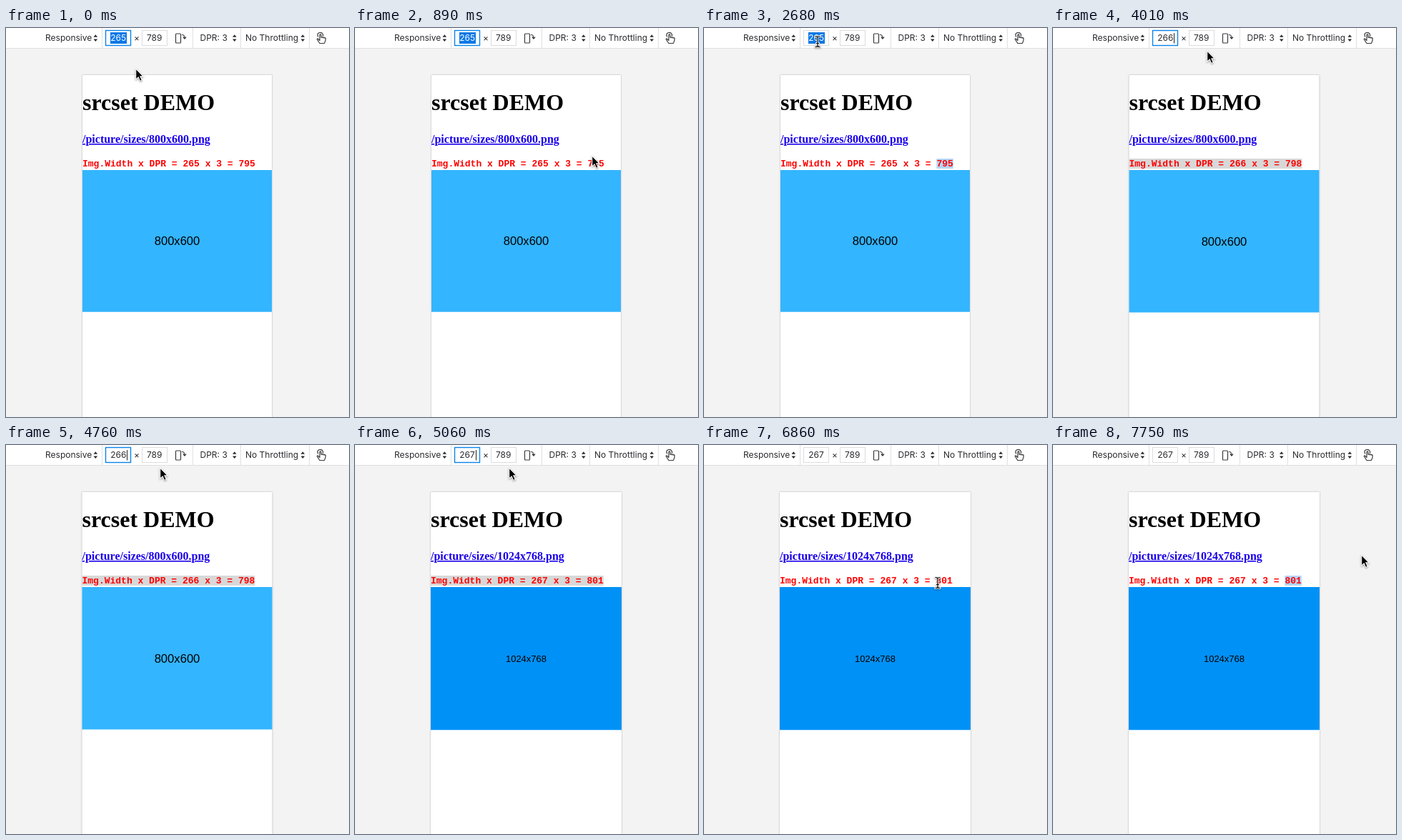
An HTML page that plays this animation: 480x545 px, repeating every 8 s.

```html
<!DOCTYPE html>
<html lang="en">
<head>
<meta charset="utf-8">
<title>srcset demo</title>
<style>
  html, body { margin: 0; width: 100%; height: 100%; overflow: hidden; background: #f3f3f3; }
  svg { display: block; width: 480px; height: 545px; }
  .bar { font: 12px Inter, sans-serif; fill: #2b2b30; }
  .rule { stroke: #e0e0e2; }
  .field { fill: #fff; stroke: #dcdcde; }
  .icon { fill: none; stroke: #3a3a3e; stroke-width: 1.2; stroke-linecap: round; stroke-linejoin: round; }
  .page { fill: #fff; filter: drop-shadow(0 0 1px #aaa); }
  h1, .title { font: bold 32px "Liberation Serif", serif; }
  .link { font: bold 16px "Liberation Serif", serif; fill: #1a00ea;
          text-decoration: underline; text-decoration-skip-ink: none; }
  .sum { font: bold 13px "Liberation Mono", monospace; fill: #f00; }
  .label { font-family: "Liberation Sans", sans-serif; text-anchor: middle; }
  .cursor { filter: drop-shadow(0 1px 1px #0006); }
</style>
</head>
<body>
<svg viewBox="0 0 480 545">
  <rect width="480" height="545" fill="#f3f3f3"/>
  <rect width="480" height="28" fill="#fff"/>
  <path class="rule" d="M0 28.5H480M134.5 0V28M261.5 0V28M328.5 0V28M424.5 0V28"/>

  <g class="bar">
    <text x="55" y="18">Responsive</text>
    <text x="179" y="18">×</text>
    <text x="271.5" y="18">DPR: 3</text>
    <text x="335" y="18">No Throttling</text>
    <path id="chevron" d="M122.5 12.8 125.3 9.3 128.1 12.8ZM122.5 15.4 125.3 18.9 128.1 15.4Z"/>
    <use href="#chevron" x="194.5"/>
    <use href="#chevron" x="290"/>
    <rect class="field" id="field" x="139.5" y="3.5" width="35" height="21"/>
    <rect id="picked" x="146" y="6" width="23" height="16" fill="#0a78e6"/>
    <text id="value" x="146.3" y="18"></text>
    <path id="caret" d="M169.5 7V21.5" stroke="#222"/>
    <rect class="field" x="190.5" y="3.5" width="35" height="21"/>
    <text x="197" y="18">789</text>
  </g>

  <g class="icon">
    <rect x="237.5" y="8" width="7" height="13" rx="1"/>
    <path d="M246.5 9.5Q250 9.5 250 14.5M248.3 13 250 15 251.7 13"/>
    <path d="M439 17.5 436.3 14.8Q435 14.6 435.4 16L439 21.5H445.5Q447.5 18.5 447.3 14.5 446.3 13 445 14 444.4 12.6 443 13.6 442.4 12.5 441 13.2V9.6Q440 8.3 439 9.6Z"/>
    <path d="M436.6 12Q434.8 8.5 438 6.8 441.5 5.6 443.4 8.5 444 10 443.4 11.3"/>
  </g>

  <rect class="page" id="page" y="66" height="500"/>
  <g id="content">
    <text class="title" y="114.5">srcset DEMO</text>
    <text class="link" id="link" y="161"></text>
    <rect id="mark" y="183" height="14"/>
    <text class="sum" id="sum" y="193.5"></text>
    <rect id="image" y="199"/>
    <text class="label" id="label"></text>
  </g>

  <g class="cursor" id="arrow">
    <path d="M.7 1V16.2L4.2 12.9 6.6 18.4 9.3 17.3 6.9 11.9H11.3Z" stroke="#fff" stroke-width="1.1"/>
  </g>
  <g class="cursor" id="beam" fill="none" stroke-linecap="square">
    <path id="stem" d="M-3-7.5Q0-7.5 0-5.5 0-7.5 3-7.5M0-5.5V5.5M-3 7.5Q0 7.5 0 5.5 0 7.5 3 7.5M-1.5 2.5H1.5" stroke="#fff" stroke-width="2.6"/>
    <use href="#stem"/>
    <path d="M-3-7.5Q0-7.5 0-5.5 0-7.5 3-7.5M0-5.5V5.5M-3 7.5Q0 7.5 0 5.5 0 7.5 3 7.5M-1.5 2.5H1.5" stroke="#000" stroke-width="1.2"/>
  </g>
</svg>

<script>
const LOOP = 8000;
const $ = id => document.getElementById(id);
const arrow = (x, y) => ({ cursor: 'arrow', x, y });
const beam = (x, y) => ({ cursor: 'beam', x, y });

const MARKS = { word: '#b4d5f5', wordIdle: '#d8d8d8', lineIdle: '#d8d8d8' };

// Each step changes part of the state and holds until the next one.
const steps = [
  [0, { width: 265, focus: true, picked: true, caret: false, mark: '', ...arrow(181, 56) }],
  [450, arrow(208, 84)],
  [600, arrow(278, 136)],
  [740, arrow(343, 172)],
  [890, arrow(331, 178)],
  [1040, beam(338, 189)],
  [1190, { focus: false, picked: false }],
  [1340, { mark: 'word' }],
  [1930, arrow(270, 145)],
  [2080, beam(181, 95)],
  [2380, arrow(163, 42)],
  [2530, beam(159, 19)],
  [2680, { picked: true }],
  [2820, { focus: true, mark: 'wordIdle' }],
  [2970, beam(163, 19)],
  [3120, arrow(185, 24)],
  [3270, arrow(207, 29)],
  [3420, arrow(215, 31)],
  [4010, { width: 266, picked: false, caret: true, mark: 'lineIdle' }],
  [4310, { caret: false }],
  [4760, { caret: true }],
  [5060, { width: 267 }],
  [5360, { caret: false }],
  [5810, { caret: true, ...arrow(222, 46) }],
  [5960, arrow(270, 112)],
  [6110, arrow(330, 172)],
  [6260, { caret: false, ...arrow(354, 193) }],
  [6410, beam(336, 193)],
  [6560, beam(327, 193)],
  [6860, { focus: false, mark: '' }],
  [7010, { mark: 'word' }],
  [7310, arrow(385, 172)],
  [7450, arrow(438, 161)],
  [7750, arrow(431, 153)],
];

function stateAt(time) {
  return Object.assign({}, ...steps.filter(([start]) => start <= time).map(step => step[1]));
}

function set(id, attrs) {
  for (const name in attrs) $(id).setAttribute(name, attrs[name]);
}

function show(id, visible) {
  $(id).style.display = visible ? '' : 'none';
}

function drawPage({ width, mark }) {
  const large = width * 3 > 800;
  const [w, h] = large ? [1024, 768] : [800, 600];
  const left = 239.5 - width / 2;
  const height = width * 0.75;
  const wholeLine = mark === 'lineIdle';

  set('page', { x: left, width });
  set('content', { transform: `translate(${left} 0)` });
  $('link').textContent = `/picture/sizes/${w}x${h}.png`;
  $('sum').textContent = `Img.Width x DPR = ${width} x 3 = ${width * 3}`;
  $('label').textContent = `${w}x${h}`;
  set('image', { width, height, fill: large ? '#0091f7' : '#33b5ff' });
  const size = 50 * width / w;
  set('label', { x: width / 2, y: 199 + height / 2 + size * 0.36, 'font-size': size });
  set('mark', {
    x: wholeLine ? 0 : 218.4,
    width: wholeLine ? 241.8 : 23.4,
    fill: MARKS[mark] || 'none',
  });
}

function draw(state) {
  drawPage(state);
  $('field').style.stroke = state.focus ? '#0a84e8' : '';
  $('field').style.strokeWidth = state.focus ? 1.4 : 1;
  $('value').textContent = state.width;
  $('value').style.fill = state.picked ? '#fff' : '';
  show('picked', state.picked);
  show('caret', state.caret);
  for (const id of ['arrow', 'beam']) show(id, id === state.cursor);
  set(state.cursor, { transform: `translate(${state.x} ${state.y})` });
}

const began = performance.now();
function tick() {
  draw(stateAt((performance.now() - began) % LOOP));
  requestAnimationFrame(tick);
}
tick();
</script>
</body>
</html>
```
